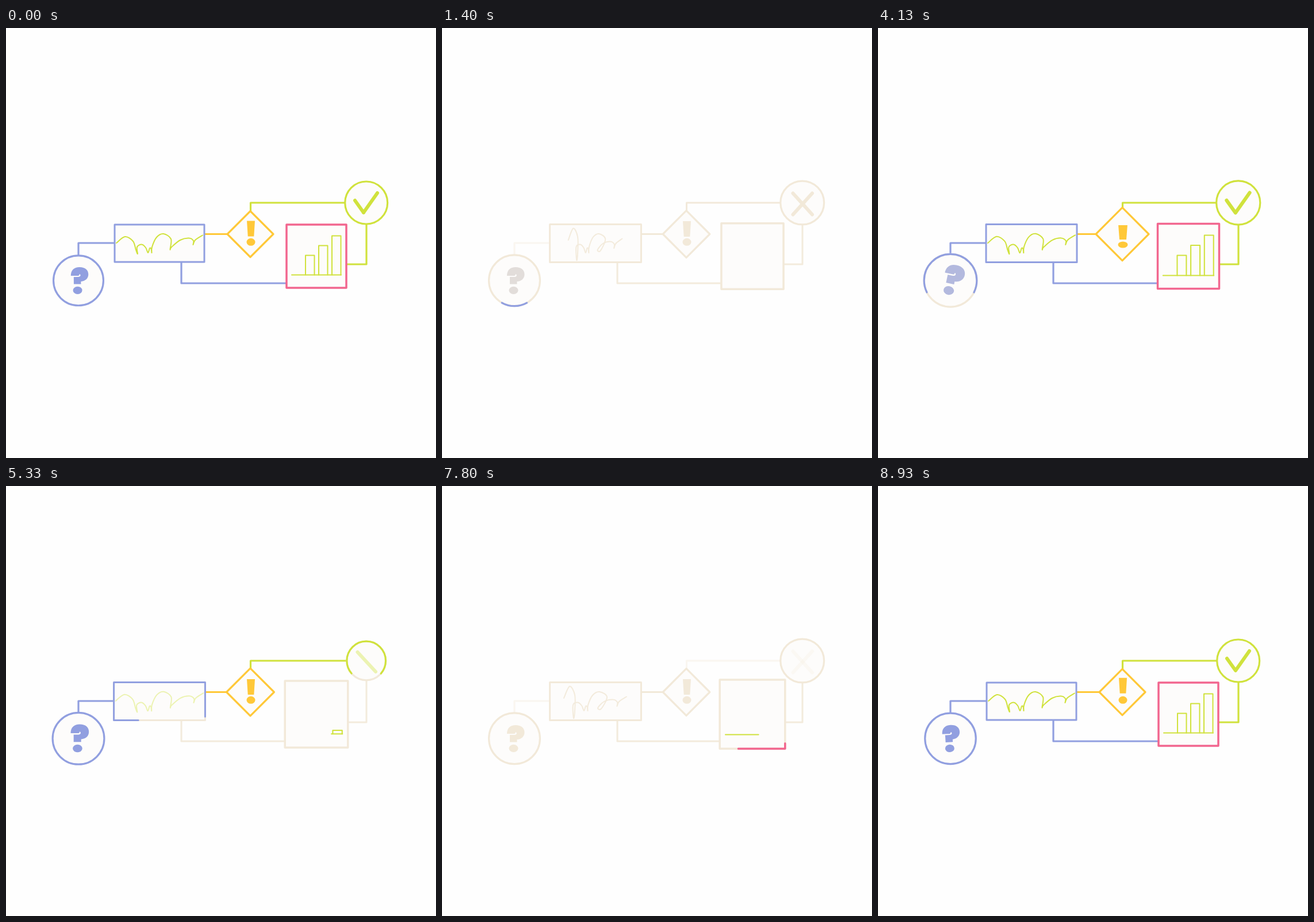
Animation of 748x748 px, one loop 8.99 s. Source, as an HTML page with a canvas:

```html
<!DOCTYPE html>
<html lang="en">
<head>
<meta charset="utf-8">
<title>Flow diagram</title>
<style>
  html, body { margin: 0; width: 100%; height: 100%; overflow: hidden; background: #fefefe; }
  canvas { display: block; width: 100vw; height: 100vh; }
</style>
</head>
<body>
<canvas width="748" height="748"></canvas>
<script>
const ctx = document.querySelector('canvas').getContext('2d');
const PERIOD = 4495; // two passes make one 8990 ms loop
const BLUE = [145, 159, 224], YELLOW = [255, 200, 56], GREEN = [208, 226, 60];
const PINK = [242, 102, 143], CREAM = [242, 233, 217], PAPER = [253, 252, 251];

let t = 0;
const rgb = c => `rgb(${c.join()})`;
const clamp = u => Math.min(1, Math.max(0, u));
const lerp = (a, b, u) => a + (b - a) * u;
const between = (p, q, u) => p.map((v, i) => lerp(v, q[i], u)); // points and colours

// Quadratic ease in and out between two moments.
function ease(from, to) {
  const u = clamp((t - from) / (to - from));
  return u < .5 ? 2 * u * u : 1 - 2 * (1 - u) ** 2;
}

const erasing = () => t < 2200;

// 1 while coloured, 0 while blank.
const shown = (outAt, inAt, span = 260) =>
  erasing() ? 1 - ease(outAt, outAt + span) : ease(inAt, inAt + span);

// A short swell around one moment, wrapping over the loop.
function bell(at, width = 150) {
  const d = (t - at + PERIOD * 1.5) % PERIOD - PERIOD / 2;
  return Math.exp(-((d / width) ** 2));
}

// Blank shapes stand a little larger and breathe; `pop` adds the swells.
function scaleOf(rest, pop) {
  const blank = 1 - shown(500, 4000, 350);
  const breath = .5 * ease(1100, 1400) * (1 - ease(2900, 3270)) * Math.sin((t - 1400) * 2 * Math.PI / 935);
  return 1 + rest * (blank + breath) + pop;
}

function stroke(path, color, width, alpha = 1) {
  if (alpha <= 0) return;
  ctx.globalAlpha = alpha;
  ctx.strokeStyle = rgb(color);
  ctx.lineWidth = width;
  ctx.stroke(path);
  ctx.globalAlpha = 1;
}

function line(...points) {
  const path = new Path2D();
  points.forEach(p => path.lineTo(...p));
  return path;
}

function segment(from, to, u, color, alpha) {
  if (u > 0) stroke(line(from, between(from, to, u)), color, 6, alpha);
}

// Filled outline whose coloured part is centred on a position along the path.
function outline(path, length, color, visible, center, width = 3.2) {
  ctx.fillStyle = rgb(PAPER);
  ctx.fill(path);
  if (visible < 1) {
    stroke(path, CREAM, width);
    ctx.setLineDash([visible * length, (1 - visible) * length]);
    ctx.lineDashOffset = (visible / 2 - center) * length;
  }
  if (visible > 0) stroke(path, color, width);
  ctx.setLineDash([]);
}

function polygon(points, length, ...style) {
  const path = line(...points);
  path.closePath();
  outline(path, length, ...style);
}

function box(cx, cy, halfW, halfH, ...style) {
  const corners = [[-1, -1], [1, -1], [1, 1], [-1, 1]];
  polygon(corners.map(([x, y]) => [cx + x * halfW, cy + y * halfH]), 4 * (halfW + halfH), ...style);
}

// The centre of the coloured part counts clockwise from the top.
function ring(cx, cy, r, color, visible, center) {
  const path = new Path2D();
  path.arc(cx, cy, r, 0, 2 * Math.PI);
  path.closePath();
  outline(path, 2 * Math.PI * r, color, visible, center - .25);
}

function dot(x, y, rx, ry) {
  ctx.beginPath();
  ctx.ellipse(x, y, rx, ry, 0, 0, 2 * Math.PI);
  ctx.fill();
}

function grouped(cx, cy, sx, sy, degrees, draw) {
  ctx.save();
  ctx.translate(cx, cy);
  ctx.rotate(degrees * Math.PI / 180);
  ctx.scale(sx, sy);
  ctx.translate(-cx, -cy);
  draw();
  ctx.restore();
}

function connector(color, visible, faint, ...points) {
  const path = line(...points);
  if (visible < 1) stroke(path, CREAM, 3, faint);
  stroke(path, color, 3.2, visible);
}

function connectors() {
  const fading = 1 - .6 * ease(1300, 1900);
  connector(BLUE, shown(1100, 3850), .4, [126, 400], [126, 374], [192, 374]);
  connector(YELLOW, shown(1000, 3800), 1, [340, 358.5], [390, 358.5]);
  connector(GREEN, shown(950, 3700), fading, [425.5, 325], [425.5, 304], [596, 304]);
  connector(GREEN, shown(550, 3500), .9, [627, 335], [627, 411], [588, 411]);
  connector(BLUE, shown(570, 3600), .9, [305, 400], [305, 444], [492, 444]);
}

function question() {
  const visible = shown(1215, 3980);
  const scale = scaleOf(.033, .02 * bell(950) + .1 * bell(4270));
  ring(126, 439.3, 43 * scale, BLUE, visible, erasing() ? .5 : 0);

  const size = 1 + .04 * bell(850) + .14 * bell(4130);
  grouped(126, 451, size, size, 12 * bell(4130) - 6 * bell(4390, 70), () => {
    ctx.fillStyle = rgb(between(CREAM, BLUE, visible));
    ctx.fill(new Path2D('M113 431C113 421 119 416 128 416C138 416 143.5 421 143.5 428.5' +
      'C143.5 436 138 440.5 130.5 441V445.5H118V433Z'));
    dot(124.5, 456.3, 8, 6.6);
    stroke(new Path2D('M112 432H126Q129.5 431.5 128.5 429.5'), PAPER, 2.2);
  });
}

// Key points of the wide scribble.
const SCRIBBLE = [[192, 374], [207, 363], [221, 371], [226, 386], [229, 393], [228, 381], [236, 376.5], [243, 382],
  [247, 391], [250, 383], [252.5, 384], [253.5, 391], [254, 381], [262, 364], [274, 358], [287, 367],
  [285.5, 385], [288, 381], [303, 369], [318, 365.5], [326, 370], [325.5, 377], [329, 369], [342, 360.5]];

// Pulling both ends inwards turns the cusps into loops.
function looped([x, y], i) {
  const left = clamp(1 - i / 4), right = clamp((i - 15) / 2.5);
  return [x + 20 * left - 21 * right, y + (i < 5 ? .85 * (y - 380) : 6 * right)];
}

function smooth(points) {
  const path = new Path2D();
  path.moveTo(...points[0]);
  for (let i = 0; i < points.length - 1; i++) {
    const p = points[i], q = points[i + 1];
    const before = points[i - 1] || p, after = points[i + 2] || q;
    path.bezierCurveTo(p[0] + (q[0] - before[0]) / 6, p[1] + (q[1] - before[1]) / 6,
      q[0] - (after[0] - p[0]) / 6, q[1] - (after[1] - p[1]) / 6, ...q);
  }
  return path;
}

function scribble() {
  const scale = scaleOf(.018, 0);
  box(267, 374.5, 78 * scale, 32.5 * scale, BLUE, shown(740, 3650), .122, 3);

  const wide = shown(870, 3450, 360);
  const squeeze = lerp(.86, 1, ease(1400, 2000));
  const path = smooth(SCRIBBLE.map((p, i) => {
    const [x, y] = looped(p, i);
    const spread = [267 + (p[0] - 267) * scale, 374.5 + (p[1] - 374.5) * scale];
    return between([267 + (x - 267) * squeeze, y], spread, wide);
  }));
  stroke(path, CREAM, 2, .9 * ease(950, 1200) * (1 - ease(3400, 3600)));
  stroke(path, GREEN, 2, shown(690, 3600));
}

function warning() {
  const visible = shown(920, 3800);
  const r = 40 * scaleOf(.02, .05 * bell(1000) + .17 * bell(4060));
  const x = 425, y = 358.5;
  polygon([[x, y - r], [x + r, y], [x, y + r], [x - r, y]], 4 * Math.SQRT2 * r,
    YELLOW, visible, erasing() ? .5 : 0);

  const squash = bell(4130, 100);
  const drop = 6 * squash - 3 * bell(4400, 70);
  ctx.fillStyle = rgb(between(CREAM, YELLOW, visible));
  grouped(426, 350 + drop, 1 + .13 * squash, 1 - .08 * squash, 0, () =>
    ctx.fill(new Path2D(`M419 ${336 + drop}H433L431.3 ${363 + drop}H420.7Z`)));
  dot(426, 372.3 + 4.7 * squash, 7.5 + squash, 6.5 - squash);
}

function verdict() {
  const scale = scaleOf(.025, .19 * bell(3880) - .11 * bell(835));
  ring(626.7, 304, 37 * scale, GREEN, shown(740, 3500), erasing() ? 0 : .5);

  const green = shown(690, 3600);
  if (erasing()) {
    // The tick loses its long arm while the short one stretches into the cross.
    const open = ease(560, 810);
    const start = between([607, 300], [611.5, 289], open);
    const corner = between([622, 321], [643, 323], open);
    segment(start, corner, 1, GREEN, green);
    segment(corner, [646, 287], 1 - ease(560, 760), GREEN, green);
  } else {
    grouped(626.7, 304, scale, scale, 0, () => {
      const corner = between([607, 300], [622, 321], ease(3600, 3700));
      const tip = between(corner, [646, 287], ease(3680, 3820));
      stroke(line([607, 300], corner, tip), GREEN, 6, green);
    });
  }
  const cross = ease(930, 1150) * (1 - .75 * ease(2900, 3220)) * (1 - ease(3350, 3500));
  segment([610.5, 287.5], [644, 324.5], 1, CREAM, cross);
  segment([644, 287.5], [610.5, 324.5], ease(1000, 1250), CREAM, cross);
}

function chart() {
  const scale = scaleOf(.04, .06 * bell(650) + .085 * bell(3410));
  box(540, 397, 52 * scale, 55 * scale, PINK, shown(430, 3225), .577, 3.5);

  grouped(540, 397, scale, scale, 0, () => {
    const floor = 429.5;
    const length = 86 * shown(600, 3110, 350);
    const left = erasing() ? 583 - length : 497;
    if (length > 0) stroke(line([left, floor], [left + length, floor]), GREEN, 2);
    for (let i = 0; i < 3; i++) {
      const x = 521 + 23 * i;
      const height = (34 + 17 * i) * shown(300 + 90 * i, 3380 + 90 * i, 450);
      if (height > .3) {
        stroke(line([x, floor], [x, floor - height], [x + 15.5, floor - height], [x + 15.5, floor]), GREEN, 2);
      }
    }
  });
}

function draw(now) {
  t = now % PERIOD;
  ctx.fillStyle = '#fefefe';
  ctx.fillRect(0, 0, 748, 748);
  ctx.lineCap = ctx.lineJoin = 'round';
  connectors();
  question();
  scribble();
  warning();
  verdict();
  chart();
  requestAnimationFrame(draw);
}
requestAnimationFrame(draw);
</script>
</body>
</html>
```
